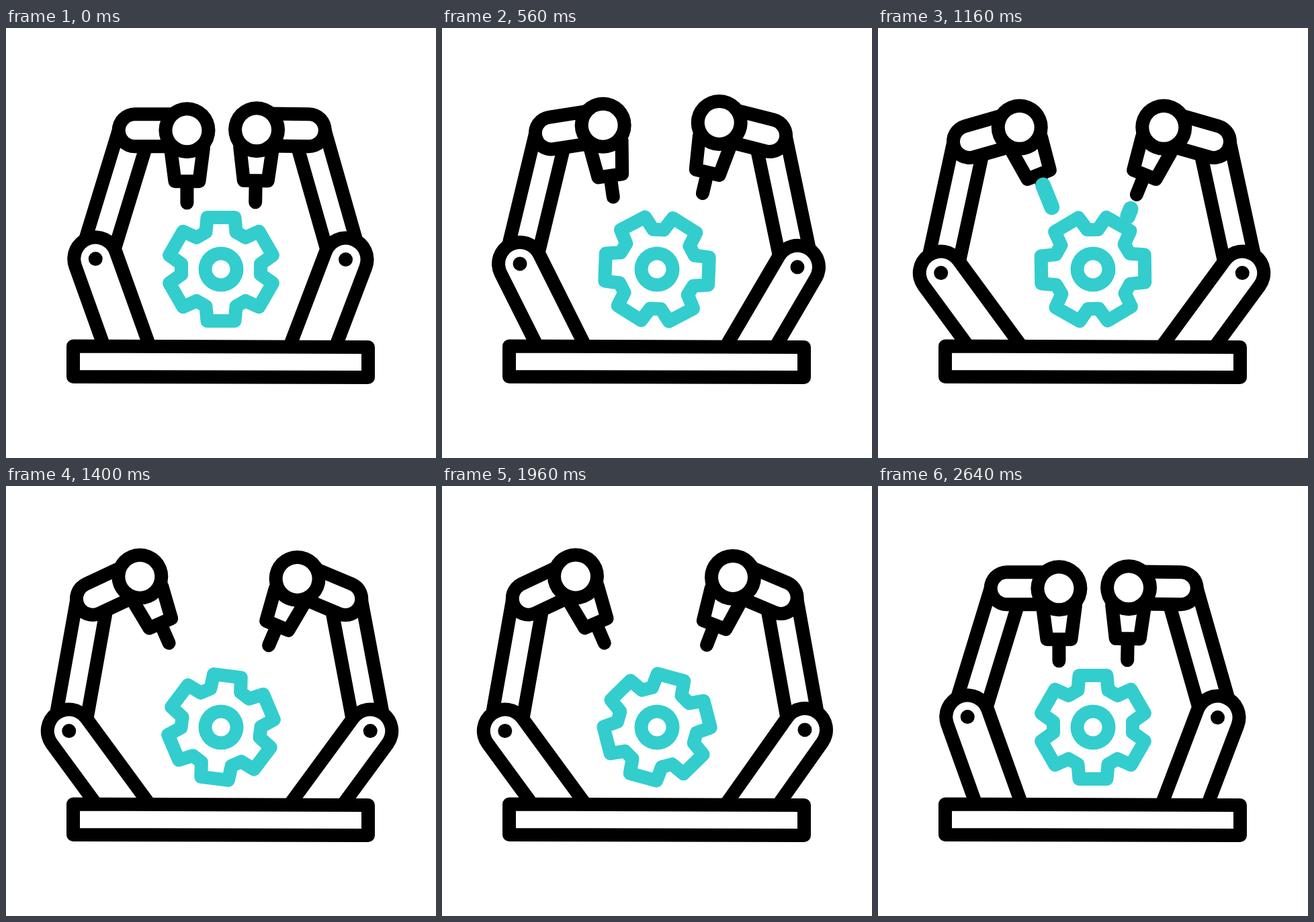
Animation, 640 px wide and 640 px high, one loop 3 s. Source, as an HTML page with a canvas:

```html
<!DOCTYPE html>
<html lang="en">
<head>
<meta charset="utf-8">
<title>Robot arms</title>
<style>
  html, body { margin: 0; width: 100%; height: 100%; overflow: hidden; background: #fff; }
  canvas { display: block; width: 640px; height: 640px; }
</style>
</head>
<body>
<canvas id="stage" width="640" height="640"></canvas>
<script>
const ctx = document.getElementById('stage').getContext('2d');
const TEAL = '#33cdce', BLACK = '#000', WHITE = '#fff';
const LOOP = 3000, STEP = 40, RAD = Math.PI / 180;

// Poses in degrees: lower link, forearm, top link, tool
const REST_LEFT = [19.7, 17, 0, 0];
const REST_RIGHT = [20.8, 15.9, 0.7, 1];
const RAISED = [36.3, 10, 25.7, 23.7];
const DIPPED = [36.3, 12.2, 15.9, 22];
// Each joint opens this much later and closes this much earlier, in ms
const LAG = [12, -20, 45, 45];
const RIGHT_LEAD = 85;
const WELDS = [1060, 1590], WELD_TIME = 200;

const armTracks = rest => rest.map((closed, joint) => {
  const up = RAISED[joint], down = DIPPED[joint], lag = LAG[joint];
  return [
    [270 + lag, closed], [895 + lag, up],
    [1060, down], [1260, down], [1425, up],
    [1590, down], [1790, down], [1955 - lag, up],
    [2600 - lag, closed]
  ];
});
const LEFT_ARM = armTracks(REST_LEFT), RIGHT_ARM = armTracks(REST_RIGHT);
const GEAR_KEYS = [[0, 0], [320, -8], [800, -51.7], [1160, -90.7], [1640, -134.5], [1960, -164.5], [2640, -180]];

const clamp = x => Math.max(0, Math.min(1, x));
const smooth = x => (x = clamp(x), x * x * (3 - 2 * x));
const polar = ([x, y], r, deg) => [x + r * Math.sin(deg * RAD), y - r * Math.cos(deg * RAD)];

function easedAt(keys, t) {
  const next = keys.findIndex(k => k[0] > t);
  if (next <= 0) return keys[0][1];
  const [t0, a] = keys[next - 1], [t1, b] = keys[next];
  return a + (b - a) * smooth((t - t0) / (t1 - t0));
}

// Smooth curve through the keys, at rest at both ends
function curveAt(keys, t) {
  const next = keys.findIndex(k => k[0] > t);
  if (next < 0) return keys[keys.length - 1][1];
  const slope = i => i > 0 && i < keys.length - 1
    ? (keys[i + 1][1] - keys[i - 1][1]) / (keys[i + 1][0] - keys[i - 1][0]) : 0;
  const [t0, a] = keys[next - 1], [t1, b] = keys[next];
  const d = t1 - t0, u = (t - t0) / d, v = 1 - u;
  return a + (b - a) * smooth(u) + d * u * v * (slope(next - 1) * v - slope(next) * u);
}

function poly(points, color, width, closed) {
  ctx.beginPath();
  points.forEach(p => ctx.lineTo(...p));
  if (closed) ctx.closePath();
  ctx.strokeStyle = color;
  ctx.lineWidth = width;
  ctx.stroke();
}

function disc([x, y], r, color) {
  ctx.beginPath();
  ctx.arc(x, y, r, 0, 7);
  ctx.fillStyle = color;
  ctx.fill();
}

function capsule(a, b, r) {
  poly([a, b], BLACK, 2 * r);
  poly([a, b], WHITE, 2 * r - 40);
}

function drawGear(angle) {
  const center = [320, 359], outline = [];
  for (let a = angle; a < angle + 359; a += 60) {
    outline.push(polar(center, 79.7, a - 14.9), polar(center, 79.7, a + 14.9),
                 polar(center, 59.5, a + 22.3), polar(center, 59.5, a + 37.7));
  }
  poly(outline, TEAL, 20, true);
  disc(center, 33.5, TEAL);
  disc(center, 13.5, WHITE);
}

function drawArm(tracks, t) {
  const [lower, fore, top, tool] = tracks.map(keys => easedAt(keys, t));
  const root = [185.5, 489.5];
  const shoulder = polar(root, 155, -lower);
  const elbow = polar(shoulder, 200, fore);
  const head = polar(elbow, 77.7, 90 - top);

  capsule(shoulder, elbow, 33);
  capsule(elbow, head, 34);

  ctx.save();
  ctx.translate(...head);
  ctx.rotate(-tool * RAD);
  poly([[0, 80], [0, 108]], BLACK, 20);
  poly([[-24.5, 26], [-18, 76], [18, 76], [24.5, 26]], BLACK, 20);
  ctx.restore();
  disc(head, 42, BLACK);
  disc(head, 22, WHITE);

  ctx.save();
  ctx.beginPath();
  ctx.rect(0, 0, 640, 475);
  ctx.clip();
  capsule(shoulder, root, 42);
  ctx.restore();
  disc(shoulder, 10.5, BLACK);

  for (const start of WELDS) {
    const u = (t - start) / WELD_TIME;
    if (u <= 0 || u >= 1) continue;
    const tail = 86 + 57 * u ** 3, tip = 86 + 57 * smooth(u / 0.75);
    poly([polar(head, tail, 180 - tool), polar(head, tip, 180 - tool)], TEAL, 23);
  }
}

function draw(t) {
  ctx.fillStyle = WHITE;
  ctx.fillRect(0, 0, 640, 640);
  ctx.lineCap = ctx.lineJoin = 'round';
  drawGear(curveAt(GEAR_KEYS, t));
  drawArm(LEFT_ARM, t);
  ctx.save();
  ctx.translate(636, 0);
  ctx.scale(-1, 1);
  drawArm(RIGHT_ARM, t + RIGHT_LEAD);
  ctx.restore();
  poly([[100, 473.5], [539, 475], [539, 520], [100, 519]], BLACK, 20, true);
}

function frame() {
  const t = performance.now() % LOOP;
  draw(Math.floor(t / STEP) * STEP);
  requestAnimationFrame(frame);
}
frame();
</script>
</body>
</html>
```
